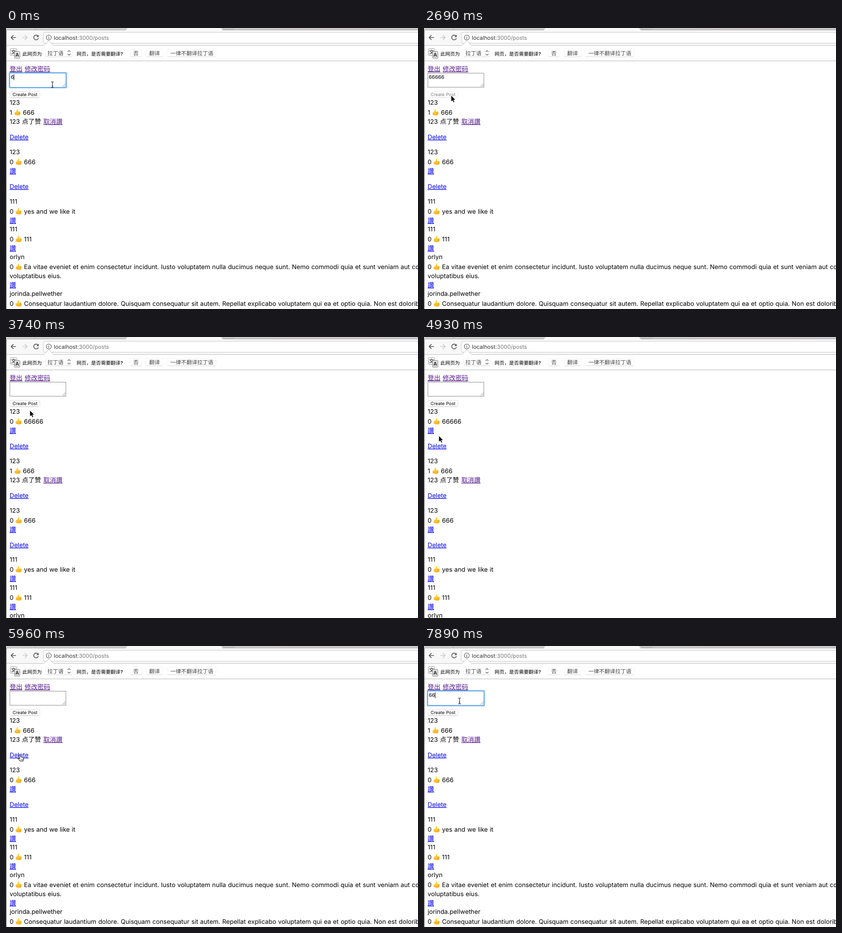
Recreate the animation shown at these times as an HTML page. Size 905x619 px, loop 8 s.

```html
<!DOCTYPE html>
<html lang="zh">
<head>
<meta charset="utf-8">
<title>Posts</title>
<style>
html, body { margin: 0; width: 100%; height: 100%; overflow: hidden; background: #fff; }
svg { display: block; width: 905px; height: 619px; }
text {
  font: 13.7px Inter, "Noto Sans CJK SC", "Noto Sans CJK", sans-serif;
  word-spacing: .5px;
  text-rendering: geometricPrecision;
  white-space: pre;
}
.cjk { font-size: 14px; }
.link, .seen {
  fill: #00e; text-decoration: underline; text-decoration-thickness: 1px;
  text-underline-offset: 1px; text-decoration-skip-ink: none;
}
.seen { fill: #551a8b; }
.url { font-size: 12.1px; fill: #333; }
.note { font-size: 10.7px; font-weight: 500; }
.opt { font-size: 11.8px; fill: #444; }
.icon { fill: none; stroke: #555; stroke-width: 1.7; }
.btn { fill: #fff; stroke: #dcdcdc; }
.field { font-size: 11px; }
.small { font-size: 9.8px; }
</style>
</head>
<body>
<svg viewBox="0 0 905 619">
  <defs>
    <linearGradient id="strip">
      <stop offset="0" stop-color="#cecece"/><stop offset=".6" stop-color="#cccbcc"/>
      <stop offset=".75" stop-color="#d0c8c8"/><stop offset="1" stop-color="#cac8cb"/>
    </linearGradient>
    <linearGradient id="skin" x2="0" y2="1">
      <stop offset="0" stop-color="#ffdc4e"/><stop offset="1" stop-color="#f9b321"/>
    </linearGradient>
    <g id="thumb">
      <path d="M1 7Q3.200 6.400 4.500 4.400Q5.700 2.600 5.900 .8Q6.200 -.8 7.600 -.4Q9 .2 8.700 2.500L8.200 5H12.400Q14.200 5.400 13.400 7Q14.600 8 13.500 9.200Q14.300 10.600 12.900 11.300Q13 13.200 11 13.400H6.500Q3.500 13.300 1 11.800Z" fill="url(#skin)"/>
      <path d="M9 7.200H13M9 9.300H13M9 11.400H12.500" stroke="#e0951a" stroke-width=".6"/>
    </g>
  </defs>

  <!-- browser bar -->
  <rect width="905" height="5" fill="url(#strip)"/>
  <path d="M0 4.5H905M63 4L66 0M476 0L479 3H499L502 0" fill="none" stroke="#a9a9a9"/>
  <rect y="5" width="905" height="33" fill="#f8f8f8"/>
  <path d="M263 5L267 0H472L476 5Z" fill="#f8f8f8"/>
  <rect x="82" y="9.5" width="840" height="24" rx="3" fill="#fff" stroke="#c6c6c6"/>
  <g class="icon">
    <path d="M22 21H11.5M16.5 15.8L11.3 21L16.5 26.2"/>
    <path d="M36 21H46.5M41.5 15.8L46.7 21L41.5 26.2" stroke="#ccc"/>
    <path d="M70.2 17.5A5.3 5.3 0 1 0 71.2 22.5"/>
    <path d="M71.8 15V20H66.8Z" fill="#555" stroke="none"/>
  </g>

  <!-- translation bar -->
  <path d="M0 38.5H83.5L94 28L104.5 38.5H905V72.5H0Z" fill="#fff"/>
  <path d="M0 38.5H83.5L94 28L104.5 38.5H905" fill="none" stroke="#bdbdbd"/>
  <path d="M0 72.5H905" stroke="#b4b4b4"/>
  <circle class="icon" cx="94" cy="21" r="5.5" style="stroke-width:1.2"/>
  <path d="M94 20V24.5M94 17.5V19" stroke="#555" stroke-width="1.3"/>
  <text class="url" x="105" y="25.5">localhost<tspan fill="#777">:3000/posts</tspan></text>
  <rect x="9.5" y="45.5" width="14" height="15" rx="1" fill="#fafafa" stroke="#999"/>
  <text x="11" y="57" style="font-size:11px">文</text>
  <rect x="18.5" y="51.5" width="12" height="15" rx="1" fill="#ddd" stroke="#888"/>
  <text x="20.5" y="63" style="font-size:11px;font-weight:700" fill="#333">A</text>
  <text class="note" x="36" y="60.5">此网页为</text>
  <g fill="#fff" stroke="#f2f2f2">
    <rect x="86.5" y="46.5" width="59" height="17" rx="3"/>
    <rect x="272.5" y="46.5" width="26" height="17" rx="3"/>
    <rect x="307.5" y="46.5" width="38" height="17" rx="3"/>
    <rect x="353.5" y="46.5" width="108" height="17" rx="3"/>
  </g>
  <path d="M88 63.5H144M274 63.5H297M309 63.5H344M355 63.5H460" stroke="#d4d4d4"/>
  <text class="opt" x="91" y="59.5">拉丁语</text>
  <path class="icon" d="M135.5 52.5L138.5 49.5L141.5 52.5M135.5 57L138.5 60L141.5 57" style="stroke-width:1.2"/>
  <text class="note" x="155" y="60.5">网页，是否需要翻译?</text>
  <text class="opt" x="279.5" y="59.5">否</text>
  <text class="opt" x="314.5" y="59.5">翻译</text>
  <text class="opt" x="361" y="59.5">一律不翻译拉丁语</text>

  <!-- page -->
  <text class="cjk seen" x="8" y="95">登出</text>
  <text class="cjk seen" x="41" y="95">修改密码</text>
  <rect x="8.5" y="99.5" width="123" height="31" fill="#fff" stroke="#8b8b8b"/>
  <g id="ring" fill="none" stroke="#62a5e8">
    <rect x="7" y="98" width="126" height="34" rx="2" stroke-width="3" opacity=".35"/>
    <rect x="8" y="99" width="124" height="32" rx="1" stroke-width="2"/>
  </g>
  <path d="M124 129L130.5 122.5M127.5 129L130.5 126" stroke="#888"/>
  <text id="field" class="field" x="10.5" y="112"></text>
  <rect id="caret" y="102" width="1" height="13"/>
  <g id="create">
    <rect class="btn" x="8.5" y="139.5" width="66" height="14" rx="3"/>
    <path d="M11 153.5H72" stroke="#bcbcbc"/>
    <text class="small" x="14.5" y="150">Create Post</text>
  </g>
  <g id="before"></g>
  <g id="after"></g>
  <path d="M.5 5V619" stroke="#4a4a4a"/>

  <!-- pointers -->
  <path id="arrow" d="M.5 .5V14.500L3.700 11.500L5.900 16.300L8.200 15.300L6.100 10.500H10.300Z" stroke="#fff" stroke-width=".8"/>
  <path id="beam" d="M-3 -6.500Q0 -6.500 0 -4.500Q0 -6.500 3 -6.500M0 -5V5M-3 6.500Q0 6.500 0 4.500Q0 6.500 3 6.500M-1.500 2.500H1.500" fill="none" stroke="#222" stroke-width="1.2"/>
  <g id="hand" stroke="#111">
    <path d="M-1.500 .5Q0 -1.500 1.200 .5L2.600 4.700Q4 3.600 4.700 5Q6.200 4.200 6.900 5.700Q8.600 5.300 8.700 7.500Q8.900 10 7.600 11.500V13.500H1.500L-3.600 8.300Q-3.600 6.400 -1.600 7.300L.2 8.300Z" fill="#fff" stroke-width="1.1"/>
    <path d="M3 8.500V11.500M5 8.500V11.500M7 8.500V11.500" stroke-width=".7"/>
  </g>
</svg>
<script>
const $ = id => document.getElementById(id);
const NS = 'http://www.w3.org/2000/svg';
const STEP = 148.7, LOOP = 8000;

function add(parent, tag, attrs, content = '') {
  const el = document.createElementNS(NS, tag);
  for (const key in attrs) el.setAttribute(key, attrs[key]);
  el.textContent = content;
  parent.append(el);
}

const posts = [
  { name: '123', body: ['666'], own: true, liked: true },
  { name: '123', body: ['666'], own: true },
  { name: '111', body: ['yes and we like it'] },
  { name: '111', body: ['111'] },
  { name: 'orlyn', body: [
    'Ea vitae eveniet et enim consectetur incidunt. Iusto voluptatem nulla ducimus neque sunt. Nemo commodi quia et sunt veniam aut commodi.',
    'voluptatibus eius.'] },
  { name: 'jorinda.pellwether', body: [
    'Consequatur laudantium dolore. Quisquam consequatur sit autem. Repellat explicabo voluptatem qui ea et optio quia. Non est doloribus.'] }
];

function drawPosts(group, list) {
  let top = 169;
  for (const { name, body, own, liked } of list) {
    const put = (x, dy, str, cls = '') =>
      add(group, 'text', { x, y: Math.round(top + dy), class: cls }, str);
    const x = liked ? 18 : 20.5;
    put(8, 0, name);
    put(8, 22, liked ? '1' : '0');
    add(group, 'use', { href: '#thumb', x, y: Math.round(top + 10) });
    put(x + 19, 22, body[0]);
    if (body[1]) put(8, 42.4, body[1]);
    const like = 42 + (body.length - 1) * 19.6;
    if (liked) {
      put(8, like, '123');
      put(35, like, '点了赞', 'cjk');
      put(82, like, '取消讚', 'cjk seen');
    } else put(8, like, '讚', 'cjk link');
    if (own) put(8, 76, 'Delete', 'link');
    top += own ? 108.8 : like + 19.2;
  }
}
drawPosts($('before'), posts);
drawPosts($('after'), [{ name: '123', body: ['66666'], own: true }, ...posts]);

// pointer path: step, x, y
const path = [
  [0, 102, 125], [11, 102, 125], [13, 77, 149], [15, 59, 148], [24, 59, 148],
  [25, 52, 161], [32, 34, 205], [33, 32, 217], [38, 30, 240], [41, 30, 240],
  [46, 78, 121], [54, 78, 121]
];

function pointerAt(n) {
  const i = path.findIndex(p => p[0] > n);
  const [a, b] = [path[i - 1], path[i]];
  const k = (n - a[0]) / (b[0] - a[0]);
  return [a[1] + (b[1] - a[1]) * k, a[2] + (b[2] - a[2]) * k];
}

// [first step, characters in the field]
const typing = [[0, 1], [3, 2], [8, 3], [9, 4], [10, 5], [19, 0], [52, 1], [53, 2]];
const blinkOff = [7, 14, 15, 16, 51];
const show = (id, on) => $(id).style.display = on ? '' : 'none';

function draw(n) {
  const focus = n < 17 || n >= 47;
  const posted = n >= 19 && n < 40;
  $('field').textContent = '6'.repeat(typing.filter(t => t[0] <= n).pop()[1]);
  $('caret').setAttribute('x', Math.round(10.2 + $('field').getComputedTextLength()));
  show('caret', focus && !blinkOff.includes(n));
  show('ring', focus);
  $('create').style.opacity = n === 18 ? .5 : 1;
  show('before', !posted);
  show('after', posted);

  const kind = n < 12 || n >= 46 ? 'beam' : n >= 36 && n <= 41 ? 'hand' : 'arrow';
  for (const id of ['arrow', 'beam', 'hand']) show(id, id === kind);
  $(kind).setAttribute('transform', `translate(${pointerAt(n).map(Math.round)})`);
}

let last = -1;
function tick() {
  const n = Math.floor(performance.now() % LOOP / STEP);
  if (n !== last) draw(last = n);
  requestAnimationFrame(tick);
}
tick();
</script>
</body>
</html>
```
